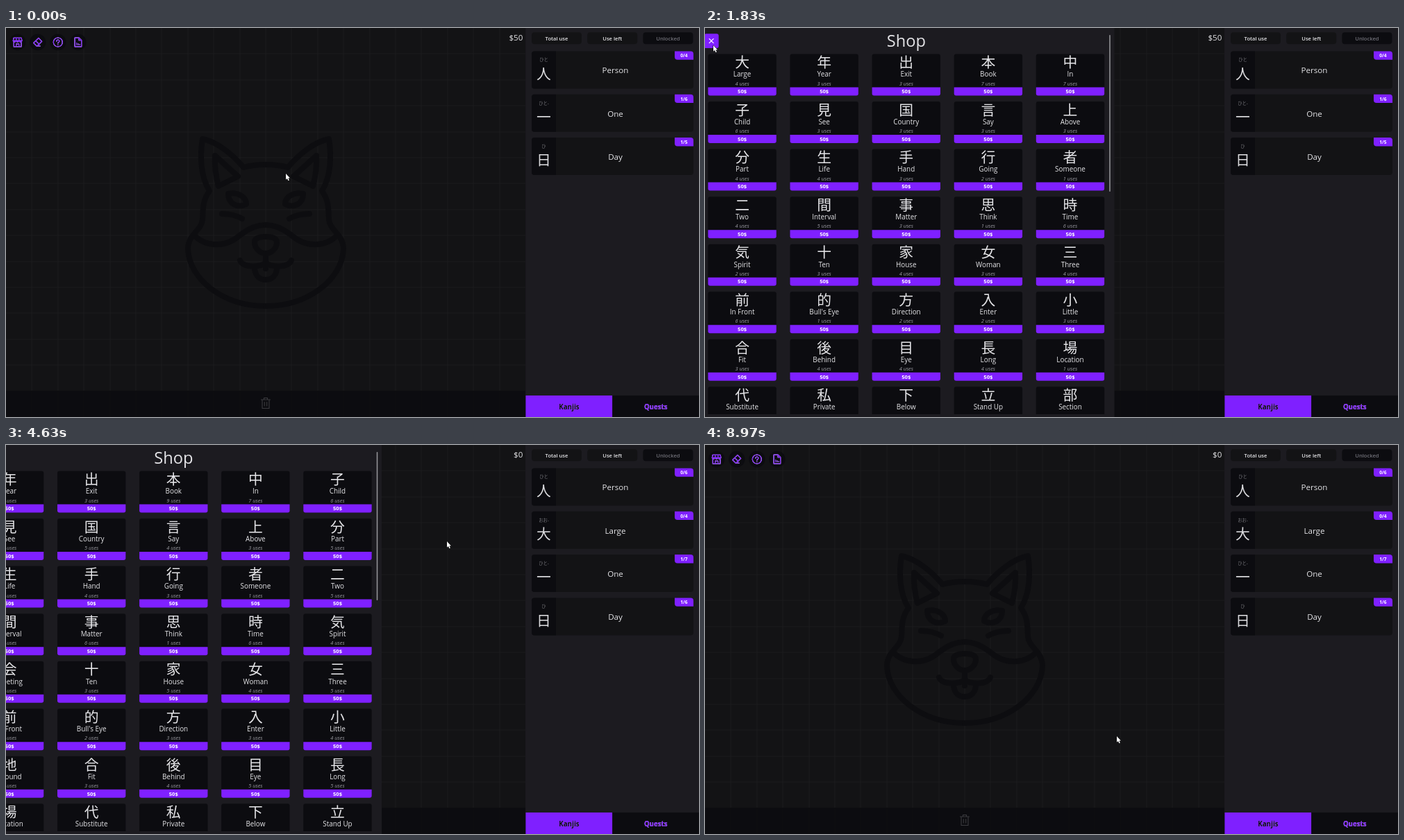
Recreate the animation shown at these times as an HTML page with a canvas. Size 998 px wide and 561 px high, loop 9710 ms.

```html
<!DOCTYPE html>
<html lang="ja">
<head>
<meta charset="utf-8">
<title>Kanji shop</title>
<style>
html, body { margin: 0; width: 100%; height: 100%; overflow: hidden; background: #131315; }
canvas { display: block; }
</style>
</head>
<body>
<canvas id="stage" width="998" height="561"></canvas>
<script>
const ctx = document.getElementById('stage').getContext('2d');
const LOOP = 9710, OPEN = 1492, BUY = 3530, CLOSE = 4590, QUESTS = 6490, KANJIS = 8465;
const FONT = '"Open Sans", "Noto Sans CJK JP", sans-serif';
const PURPLE = '#7f20ff', PANEL = '#1c1b20', DARK = '#0c0c10', CARD = '#131315', LIGHT = '#e4e4e7';

// kanji|meaning|uses before buying|uses after buying (0 = not on sale)
const GOODS = `大|Large|4|0,年|Year|3|3,出|Exit|3|3,本|Book|7|9,中|In|7|7,子|Child|6|6,見|See|3|4,国|Country|3|5,
言|Say|3|4,上|Above|3|3,分|Part|4|5,生|Life|4|5,手|Hand|3|4,行|Going|2|3,者|Someone|1|1,二|Two|4|5,
間|Interval|5|6,事|Matter|3|6,思|Think|1|1,時|Time|6|6,気|Spirit|2|4,会|Meeting|0|4,十|Ten|3|3,家|House|4|5,
女|Woman|3|4,三|Three|4|5,前|In Front|6|7,的|Bull's Eye|1|2,方|Direction|2|3,入|Enter|2|3,小|Little|3|4,
地|Ground|0|3,合|Fit|3|3,後|Behind|4|4,目|Eye|4|5,長|Long|4|5,場|Location|1|1,代|Substitute|3|3,
私|Private|3|3,下|Below|3|3,立|Stand Up|3|3,部|Section|3|3`.split(',').map(s => s.trim().split('|'));
const stock = column => GOODS.filter(g => +g[column]).slice(0, 40).map(g => [g[0], g[1], g[column]]);
const SHOP_BEFORE = stock(2), SHOP_AFTER = stock(3);

const OWNED_BEFORE = [['人', 'ひと', 'Person', '0/4'], ['一', 'ひと-', 'One', '1/6'], ['日', 'ひ', 'Day', '1/5']];
const OWNED_AFTER = [['人', 'ひと', 'Person', '0/6'], ['大', 'おお-', 'Large', '0/4'],
  ['一', 'ひと-', 'One', '1/7'], ['日', 'ひ', 'Day', '1/6']];

// Pointer moves: start, end, control point, destination
const MOVES = [
  [90, 1070, 250, 290, 16, 16],
  [1090, 1200, 14, 20, 12, 25],
  [2420, 2720, 90, 45, 163, 94],
  [2970, 3200, 115, 100, 70, 90],
  [3580, 4370, 300, 80, 635, 139],
  [4700, 5000, 639, 144, 643, 148],
  [5720, 6200, 760, 420, 925, 555],
  [7460, 8430, 870, 366, 812, 545],
  [8510, 8970, 700, 520, 593, 420]
];

const ramp = (t, from, length) => Math.min(1, Math.max(0, (t - from) / length));
const smooth = p => p * p * (3 - 2 * p);

// CSS "ease": cubic-bezier(.25, .1, .25, 1)
function ease(p) {
  const bezier = (s, a, b) => 3 * (1 - s) ** 2 * s * a + 3 * (1 - s) * s * s * b + s ** 3;
  let low = 0, high = 1;
  for (let i = 0; i < 20; i++) {
    const mid = (low + high) / 2;
    if (bezier(mid, .25, .25) < p) low = mid; else high = mid;
  }
  return bezier(low, .1, 1);
}

function pointer(t) {
  let x = 403, y = 210;
  for (const [start, end, cx, cy, toX, toY] of MOVES) {
    if (t <= start) break;
    const p = smooth(ramp(t, start, end - start)), q = 1 - p;
    x = q * q * x + 2 * q * p * cx + p * p * toX;
    y = q * q * y + 2 * q * p * cy + p * p * toY;
  }
  return [x, y];
}

const slotX = slot => 13.8 + slot % 5 * 118.1;
const slotY = slot => 37.5 + Math.floor(slot / 5) * 68.55;

function target(t) {
  const [x, y] = pointer(t);
  if (t < OPEN || t >= CLOSE) {
    if (Math.hypot(x - 16.5, y - 20.5) < 11.5) return 'store';
    if (y > 530 && x > 748) return x < 873 ? 'Kanjis' : 'Quests';
  } else if (t > 2420) {
    if (x > 8 && x < 29 && y > 8 && y < 29) return 'close';
    for (let i = 0; i < 40; i++) {
      const dx = x - slotX(i), dy = y - slotY(i);
      if (dx > 0 && dx < 98.4 && dy > 0 && dy < 60) return i;
    }
  }
  return null;
}

// Share of the last 150 ms spent over each target: a linear hover transition
function hoverLevels(t) {
  const levels = {}, samples = 15;
  for (let i = 0; i < samples; i++) {
    const id = target(t - i * 10);
    if (id !== null) levels[id] = (levels[id] || 0) + 1 / samples;
  }
  return levels;
}

function box(x, y, w, h, color, radius = 0) {
  ctx.fillStyle = color;
  ctx.beginPath();
  ctx.roundRect(x, y, w, h, radius);
  ctx.fill();
}

function text(s, x, y, size, color = LIGHT, style = '', align = 'center') {
  ctx.font = `${style} ${size}px ${FONT}`;
  ctx.textAlign = align;
  ctx.fillStyle = color;
  ctx.fillText(s, x, y);
}

function stroke(d, color, width) {
  ctx.strokeStyle = color;
  ctx.lineWidth = width;
  ctx.lineCap = ctx.lineJoin = 'round';
  ctx.stroke(new Path2D(d));
}

function at(x, y, draw) {
  ctx.save();
  ctx.translate(x, y);
  draw();
  ctx.restore();
}

function fade(alpha, draw) {
  if (alpha <= 0) return;
  ctx.save();
  ctx.globalAlpha = alpha;
  draw();
  ctx.restore();
}

const DOG_HALF = `M0-177Q-18-177-32-173C-48-192-70-210-91-214C-95-190-94-160-81-139C-92-124-90-110-91-98
  C-92-82-112-77-112-55C-110-12-62 27 0 27
  M-73-190L-40-160L-68-146Q-74-168-73-190Z
  M-54-135C-41-138-28-131-28-120C-40-114-54-120-54-135Z
  M-63-106Q-46-106-34-99
  M-104-76C-85-56-56-58-36-76Q-18-90 0-90
  M0-73C-12-73-16-70-16-65C-16-56-8-49 0-49V-36
  M-37-39C-34-28-6-28 0-36V-27
  M-16-29C-16-16-8-11 0-11`;

const ICONS = {
  store: 'M-5.6-6.2H5.6L6.3-2.2H-6.3ZM-2-6V-2.5M2-6V-2.5M-6.3-2C-6 0.2-2.6 0.2-2.2-2C-1.8 0.2 1.8 0.2 2.2-2C2.6 0.2 6-0 6.3-2M-5.3 0V6.5H5.3V0M-2 6.2V2.5H2V6.2',
  eraser: 'M-1.5 5.5L-6 1L1.2-6L6-1.2L-0.8 5.5ZM-3-2L2.2 3M-1.5 5.5H3.5',
  help: 'M6.5 0A6.5 6.5 0 1 1-6.5 0A6.5 6.5 0 1 1 6.5 0M-1.9-1.4C-1.9-4 2-4 2-1.5C2 0 0 0 0 1.5M0 3.7V3.8',
  report: 'M-4.8-6.3H1.3L4.8-2.8V6.3H-4.8ZM1.2-6V-2.8H4.5M-2.3 3.6V1M0 3.6V2.3M2.3 3.6V3'
};

function drawBoard(hover) {
  box(0, 0, 748, 561, CARD);
  ctx.fillStyle = '#1c1c1f';
  for (let i = 1; i < 20; i++) {
    ctx.fillRect(Math.round(i * 37.4) - .5, 0, 1, 561);
    if (i < 15) ctx.fillRect(0, Math.round(i * 37.4) - .5, 748, 1);
  }
  for (const side of [1, -1]) at(374, 374, () => {
    ctx.scale(side, 1);
    stroke(DOG_HALF, '#0d0d10', 8);
  });
  box(0, 523, 748, 38, 'rgba(12,12,15,.88)');
  at(374, 541, () => stroke('M-6.5-5H6.5M-2.5-5V-7.5H2.5V-5M-5-5V7.5H5V-5M-1.7-1.5V4M1.7-1.5V4', '#3b3b3f', 1.1));
  Object.entries(ICONS).forEach(([name, d], i) => at(16.6 + i * 29.1, 20.5, () => {
    box(-11.7, -11.7, 23.4, 23.4, DARK, 11.7);
    stroke(d, '#f2f2f2', 1.2);
    fade(hover[name], () => stroke(d, PURPLE, 1.2));
  }));
}

function drawShopCard([kanji, name, uses], slot, hover) {
  at(slotX(slot) + 49.2, slotY(slot) + 30, () => {
    const scale = 1 + .1 * hover;
    ctx.scale(scale, scale);
    box(-49.2, -30, 98.4, 60, DARK, 3);
    box(-49.2, 18, 98.4, 12, PURPLE, [0, 0, 3, 3]);
    text(kanji, 0, -10.3, 20.8);
    text(name, 0, 2.8, 9.9);
    text(uses + ' uses', 0, 15.2, 7.4, '#9b9ba1', 'italic');
    text('50$', 0, 26.7, 7.6, '#fff', 'bold');
  });
}

function drawShop(t, hover) {
  const shown = ease(ramp(t, OPEN, 405)) - ease(ramp(t, CLOSE, 405));
  if (shown <= 0) return;
  const bought = t >= BUY;
  at(-599 * (1 - shown), 0, () => {
    box(0, 0, 599, 561, PANEL);
    box(8.3, 8.3, 20.8, 20.8, PURPLE, 3);
    stroke('M15.6 15.6L21.6 21.6M21.6 15.6L15.6 21.6', '#fff', 1.2);
    text('Shop', 299.3, 26.5, 23.6);
    box(591.7, 10, 1.5, bought ? 214 : 226, '#98989c', .7);
    ctx.beginPath();
    ctx.rect(0, 30, 599, 527);
    ctx.clip();
    const goods = bought ? SHOP_AFTER : SHOP_BEFORE;
    goods.forEach((item, slot) => { if (!hover[slot]) drawShopCard(item, slot, 0); });
    goods.forEach((item, slot) => { if (hover[slot]) drawShopCard(item, slot, hover[slot]); });
  });
}

function drawTab(name, x, active, hover) {
  const label = color => text(name, x + 62.5, 550.2, 9.7, color, 'bold');
  box(x, 530, 125, 31, DARK);
  fade(active, () => box(x, 530, 125, 31, PURPLE));
  label(LIGHT);
  fade(hover, () => label(PURPLE));
  fade(active, () => label(DARK));
}

function drawSidebar(t, hover) {
  box(748.5, 0, 249.5, 561, PANEL);
  if (t < QUESTS || t >= KANJIS) {
    ['Total use', 'Use left', 'Unlocked'].forEach((label, i) => {
      const off = i === 2, x = 757 + i * 80.2;
      box(x, 6.3, 72, 17, off ? DARK : CARD, 4);
      text(label, x + 36, 18, 7.6, off ? '#707078' : LIGHT, '600');
    });
    (t < BUY ? OWNED_BEFORE : OWNED_AFTER).forEach(([kanji, reading, name, count], i) => at(757, 33.4 + i * 62.35, () => {
      box(0, 0, 233, 54, CARD, 4);
      box(0, 0, 35, 54, DARK, [4, 0, 0, 4]);
      box(206, 0, 27, 12.3, PURPLE, [0, 4, 0, 4]);
      text(count, 219.3, 9, 6.6, '#fff', 'bold');
      text(reading, 17.5, 15, 6.3, '#75757b');
      text(kanji, 17.5, 40.2, 20.8, '#dcdcdf');
      text(name, 120.5, 32, 11.6);
    }));
  }
  const quests = ramp(t, QUESTS, 200) - ramp(t, KANJIS, 200);
  drawTab('Kanjis', 748.5, 1 - quests, hover.Kanjis);
  drawTab('Quests', 873.2, quests, hover.Quests);
}

function drawPointer(t) {
  const [x, y] = pointer(t), id = target(t);
  const shape = new Path2D(id === null
    ? 'M0 0V8.8L2 7L3.4 10.2L4.9 9.5L3.5 6.5H6.1Z'
    : 'M-.8 .2Q0-.6.8.2V4L4.4 4.8Q5.2 5 5.1 6L4.4 10.3H-.4L-2.9 6.8Q-2.6 5.6-.8 7Z');
  at(x, y, () => {
    ctx.lineJoin = 'round';
    ctx.lineWidth = 1;
    ctx.strokeStyle = '#000';
    ctx.fillStyle = '#fff';
    ctx.stroke(shape);
    ctx.fill(shape);
  });
}

function frame(now) {
  const t = now % LOOP, hover = hoverLevels(t);
  drawBoard(hover);
  text(t < BUY ? '$50' : '$0', 744.3, 17.6, 11.6, LIGHT, '', 'right');
  drawShop(t, hover);
  drawSidebar(t, hover);
  drawPointer(t);
  requestAnimationFrame(() => frame(performance.now() - begin));
}

const begin = performance.now();
frame(0);
</script>
</body>
</html>
```
